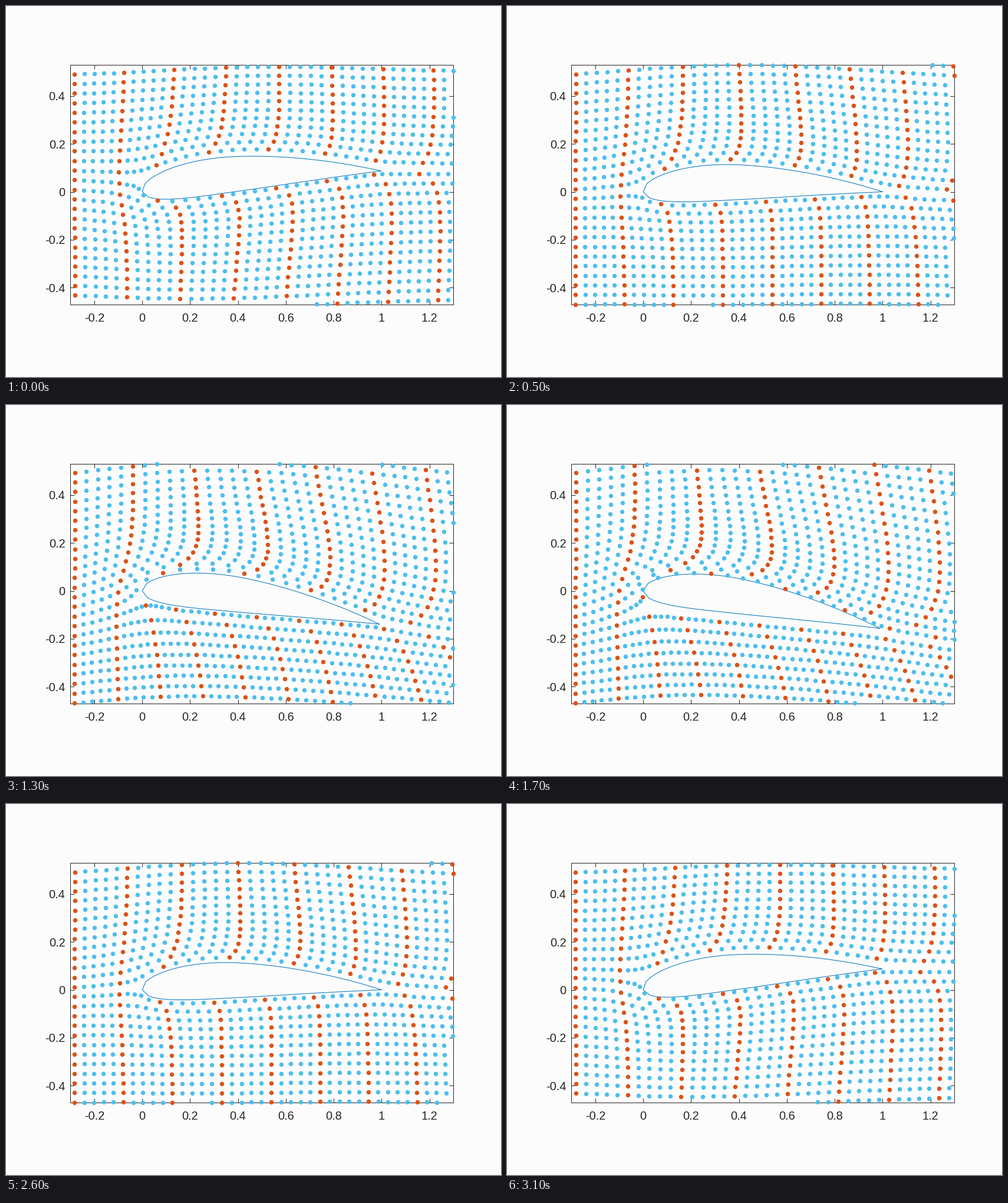
Write a matplotlib script that moves like this. It is 840x630 px and loops after 3200 ms.

```python
import numpy as np
import matplotlib.pyplot as plt
from matplotlib.animation import FuncAnimation

plt.rcParams.update({
    "font.family": "Liberation Sans",
    "font.size": 14.4,
    "axes.unicode_minus": False,
})

W, H, DPI = 840, 630, 100
PAPER, INK = "#FCFCFC", "#262626"
BLUE, SKY, RUST = "#0072BD", "#4DBEEE", "#D95319"
XLIM, YLIM = (-0.3, 1.3), (-0.47, 0.53)

ANGLES = np.arange(-5, 11)      # angle of attack in degrees
ROWS = np.arange(-0.47, 0.531, 0.04)
FIRST, STEP = 0.0180, 0.0421    # time of the first column, time between columns
COLUMNS, SUBSTEPS, ACCENT = 52, 4, 5


def airfoil(x, camber=0.04, peak=0.4, thick=0.15):
    """Closed four-digit section, anticlockwise from the trailing edge."""
    half = 5 * thick * (0.2969 * np.sqrt(x) - 0.1260 * x - 0.3516 * x**2
                        + 0.2843 * x**3 - 0.1036 * x**4)
    side = np.where(x < peak, peak, 1 - peak)
    base = np.where(x < peak, 0, 1 - 2 * peak)
    mean = camber / side**2 * (base + 2 * peak * x - x**2)
    slope = 2 * camber / side**2 * (peak - x)
    normal = 1j * np.exp(1j * np.arctan(slope))
    upper = x + 1j * mean + half * normal
    lower = x + 1j * mean - half * normal
    return np.concatenate([upper[::-1], lower[1:]])


class Flow:
    """Source panels with one common vortex strength, for all angles at once."""

    def __init__(self, nodes, alpha):
        self.a, self.b = nodes[:-1], nodes[1:]
        chord = self.b - self.a
        self.unit = chord / abs(chord)
        self.stream = np.exp(-1j * alpha)
        n = len(chord)

        infl = self.influence((self.a + self.b) / 2)
        infl *= self.unit[:, None]
        np.fill_diagonal(infl, 0.5j)
        ends = infl[0] + infl[-1]

        m = np.zeros((n + 1, n + 1))
        m[:n, :n] = infl.imag
        m[:n, n] = -infl.real.sum(axis=1)
        m[n, :n] = ends.real
        m[n, n] = ends.imag.sum()
        onset = self.unit[:, None] * self.stream
        rhs = -np.vstack([onset.imag, (onset[0] + onset[-1]).real])
        sol = np.linalg.solve(m, rhs)
        self.strength = sol[:n] - 1j * sol[n]

    def influence(self, z):
        z = z[..., None]
        return np.log((z - self.a) / (z - self.b)) / (2 * np.pi * self.unit)

    def velocity(self, z):
        induced = np.matmul(self.influence(z), self.strength.T[:, :, None])
        return np.conj(induced[..., 0] + self.stream[:, None])

    def advance(self, z, time, steps=SUBSTEPS):
        h = time / steps
        for _ in range(steps):
            k1 = self.velocity(z)
            k2 = self.velocity(z + h / 2 * k1)
            k3 = self.velocity(z + h / 2 * k2)
            k4 = self.velocity(z + h * k3)
            z = z + h / 6 * (k1 + 2 * k2 + 2 * k3 + k4)
        return z


def trace(nodes):
    """Column positions with shape (column, angle, row), wind along x."""
    alpha = np.radians(ANGLES)
    turn = np.exp(1j * alpha)[:, None]
    flow = Flow(nodes, alpha)
    z = flow.advance((XLIM[0] + 1j * ROWS) * turn, FIRST)
    columns = [z]
    for _ in range(COLUMNS - 1):
        z = flow.advance(z, STEP)
        columns.append(z)
    return np.array(columns) / turn


def visible(z):
    z = z.ravel()
    inside = ((z.real >= XLIM[0]) & (z.real <= XLIM[1])
              & (z.imag >= YLIM[0]) & (z.imag <= YLIM[1]))
    return z[inside]


def place(line, z):
    line.set_data(z.real, z.imag)


outline = airfoil(np.linspace(0, 1, 51))
paths = trace(outline)
accent = np.arange(COLUMNS) % ACCENT == 0

fig = plt.figure(figsize=(W / DPI, H / DPI), dpi=DPI, facecolor=PAPER)
ax = fig.add_axes([109.3 / W, 123.2 / H, 650 / W, 407 / H], facecolor=PAPER)
ax.set(xlim=XLIM, ylim=YLIM,
       xticks=np.arange(-1, 7) / 5, yticks=np.arange(-2, 3) / 5)
ax.set_xticklabels([f"{v:g}" for v in ax.get_xticks()])
ax.set_yticklabels([f"{v:g}" for v in ax.get_yticks()])
ax.tick_params(direction="in", top=True, right=True, length=4.7, width=0.72,
               color=INK, labelcolor=INK)
ax.tick_params(axis="x", pad=10)
ax.tick_params(axis="y", pad=6.3)
ax.set_axisbelow(True)
for spine in ax.spines.values():
    spine.set(color=INK, linewidth=0.72, zorder=1)

wing, = ax.plot([], [], color=BLUE, lw=0.72, zorder=2)
dots = dict(ls="", marker="o", ms=5.4, mew=0, clip_on=False)
plain, = ax.plot([], [], color=SKY, zorder=3, **dots)
marked, = ax.plot([], [], color=RUST, zorder=4, **dots)


def draw(i):
    k = min(i, 31 - i)
    place(wing, outline * np.exp(-1j * np.radians(ANGLES[k])))
    place(plain, visible(paths[~accent, k]))
    place(marked, visible(paths[accent, k]))
    return wing, plain, marked


anim = FuncAnimation(fig, draw, frames=32, interval=100, repeat=True,
                     repeat_delay=0, blit=False)
plt.show()
```
